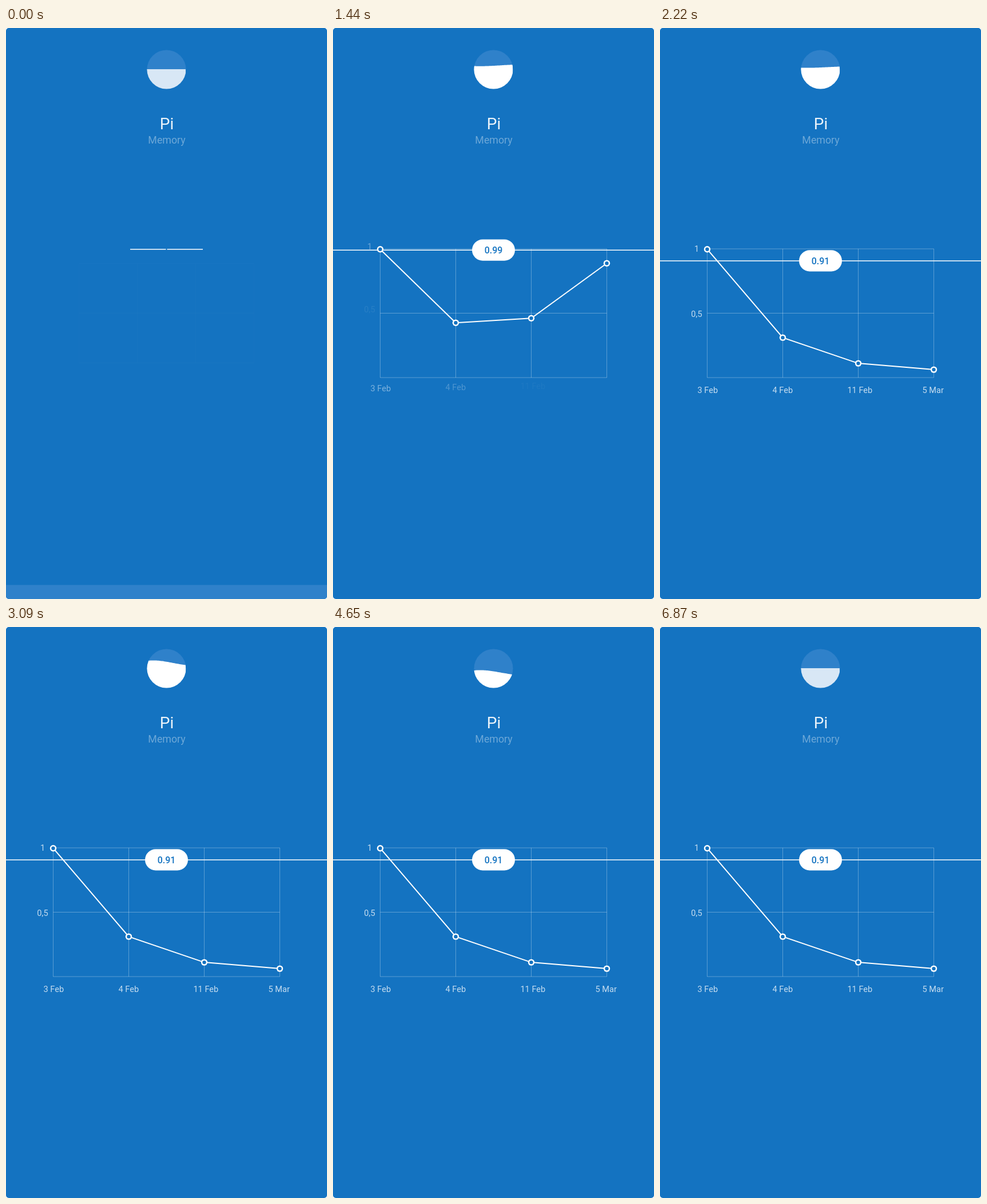
An HTML page with a canvas for the animation above (6.96 s loop, 561 px wide and 998 px high).

```html
<!DOCTYPE html>
<html lang="en">
<head>
<meta charset="utf-8">
<title>Memory chart</title>
<style>
html, body { margin: 0; width: 100%; height: 100%; overflow: hidden; background: #fff; }
canvas { display: block; }
</style>
</head>
<body>
<canvas id="stage" width="561" height="998"></canvas>
<script>
const ctx = document.getElementById('stage').getContext('2d');
const LOOP = 6960, W = 561, H = 998, CX = W / 2;
const BLUE = '#1473c1', PALE = '#2f81ca';
const FONT = 'Roboto, "Open Sans", sans-serif';
const TOP = 386.7, HEIGHT = 224.8, FALL = 932;
const RETENTION = [1, .313, .113, .064];
const DATES = ['3 Feb', '4 Feb', '11 Feb', '5 Mar'];

// Liquid: time, level in the middle, tilt to the right
const SLOSH = [
  [0, 72, 0], [960, 63.3, -6], [1440, 66, -1.2], [2220, 69, -1],
  [2600, 58, -5], [3090, 60.7, 3.8], [4650, 77.5, 3.5], [LOOP, 72, 0]
];

const clamp = v => Math.max(0, Math.min(1, v));
const span = (t, start, len) => clamp((t - start) / len);
const mix = (a, b, p) => a + (b - a) * p;
const easeOut = p => 1 - (1 - p) ** 3;
const easeInOut = p => p < .5 ? 4 * p ** 3 : 1 - 4 * (1 - p) ** 3;
const smooth = p => p * p * (3 - 2 * p);
const white = a => `rgba(255,255,255,${a})`;
const column = i => CX - 198 + 132 * i;
const valueY = v => TOP + HEIGHT * (1 - v);

function text(str, x, y, size, weight, color, align = 'center') {
  ctx.font = `${weight} ${size}px ${FONT}`;
  ctx.textAlign = align;
  ctx.fillStyle = color;
  ctx.fillText(str, x, y);
}

function line(points, width, color) {
  ctx.beginPath();
  points.forEach(([x, y]) => ctx.lineTo(x, y));
  ctx.lineWidth = width;
  ctx.strokeStyle = color;
  ctx.stroke();
}

function disc(x, y, r, fill) {
  ctx.beginPath();
  ctx.arc(x, y, r, 0, 7);
  ctx.fillStyle = fill;
  ctx.fill();
}

function drawGauge(t) {
  const r = 34.1, cy = 72.5;
  disc(CX, cy, r, PALE);
  const i = SLOSH.findIndex(key => key[0] > t);
  const a = SLOSH[i - 1], b = SLOSH[i];
  const p = smooth(span(t, a[0], b[0] - a[0]));
  const level = mix(a[1], b[1], p), tilt = mix(a[2], b[2], p);
  ctx.save();
  ctx.beginPath();
  for (let u = -1; u <= 1; u += .05) {
    ctx.lineTo(CX + u * (r + 1), level + tilt * (Math.sin(u * Math.PI / 2) + .6 * u * u));
  }
  ctx.lineTo(CX + r + 1, cy + r + 1);
  ctx.lineTo(CX - r - 1, cy + r + 1);
  ctx.clip();
  const fade = Math.min(span(t, 0, 300), 1 - span(t, 6510, 360));
  disc(CX, cy, r, white(mix(.81, 1, fade)));
  ctx.restore();
}

function drawGrid(t) {
  const p = span(t, 0, 450), s = mix(.77, 1, easeOut(p));
  const color = white(mix(.02, .3, p));
  const sx = i => CX + (column(i) - CX) * s;
  const sy = i => 498.5 + (i - 1) * 112.5 * s;
  for (let i = 0; i < 4; i++) line([[sx(i), sy(0)], [sx(i), sy(2)]], 1, color);
  for (let i = 0; i < 3; i++) line([[sx(0), sy(i)], [sx(3), sy(i)]], 1, color);
}

function drawChart(t) {
  const pts = RETENTION.map((v, i) => {
    const start = 833 + 107 * i * (i - 1) / 2;
    return [column(i), valueY(mix(1, v, easeInOut(span(t, start, FALL))))];
  });
  ctx.globalAlpha = span(t, 350, 200);
  line(pts, 2, '#fff');
  ctx.globalAlpha = 1;
  pts.forEach(([x, y], i) => {
    const s = easeOut(span(t, 300 + i * 70, 250));
    disc(x, y, 5.7 * s, '#fff');
    disc(x, y, 3.2 * s, BLUE);
  });
}

function drawMarker(t) {
  const value = mix(1, .91, easeInOut(span(t, 1195, FALL)));
  const y = valueY(value);
  const half = mix(61.5, W / 2, easeOut(span(t, 0, 330)));
  const gap = 1 - span(t, 0, 200);
  [-1, 1].forEach(side => line([[CX + side * gap, y], [CX + side * half, y]], 1.5, '#fff'));
  drawChart(t);

  const s = easeOut(span(t, 220, 380));
  if (!s) return;
  ctx.save();
  ctx.translate(CX, y);
  ctx.scale(s, s);
  ctx.beginPath();
  ctx.roundRect(-37.5, -18.6, 75, 37.2, 18.6);
  ctx.fillStyle = '#fff';
  ctx.fill();
  text(String(+value.toFixed(2)), 0, 6, 16, 500, BLUE);
  ctx.restore();
}

function drawLabel(t, str, x, y, start, align) {
  const p = span(t, start, 350);
  if (p) text(str, x, y - 8 * (1 - p), 14.6, 400, white(.75 * p), align);
}

function drawLabels(t) {
  ['1', '0,5'].forEach((str, i) => drawLabel(t, str, 64, 390.5 + 114 * i, 1265 + 135 * i));
  DATES.forEach((str, i) => drawLabel(t, str, 65.4 + 131 * i, 638.3, 1230 + 95 * i, 'left'));
}

function draw(t) {
  ctx.clearRect(0, 0, W, H);
  ctx.save();
  ctx.beginPath();
  ctx.roundRect(0, 0, W, H, 5);
  ctx.clip();
  ctx.fillStyle = BLUE;
  ctx.fillRect(0, 0, W, H);
  const panel = mix(973, H, easeOut(span(t, 0, 160)));
  ctx.fillStyle = PALE;
  ctx.fillRect(0, panel, W, H - panel);

  drawGauge(t);
  text('Pi', CX + .5, 177, 28, 400, white(.92));
  text('Memory', CX + .5, 202, 17.8, 400, white(.38));
  drawGrid(t);
  drawLabels(t);
  drawMarker(t);
  ctx.restore();
}

const begin = performance.now();
function tick() {
  draw((performance.now() - begin) % LOOP);
  requestAnimationFrame(tick);
}
tick();
</script>
</body>
</html>
```
